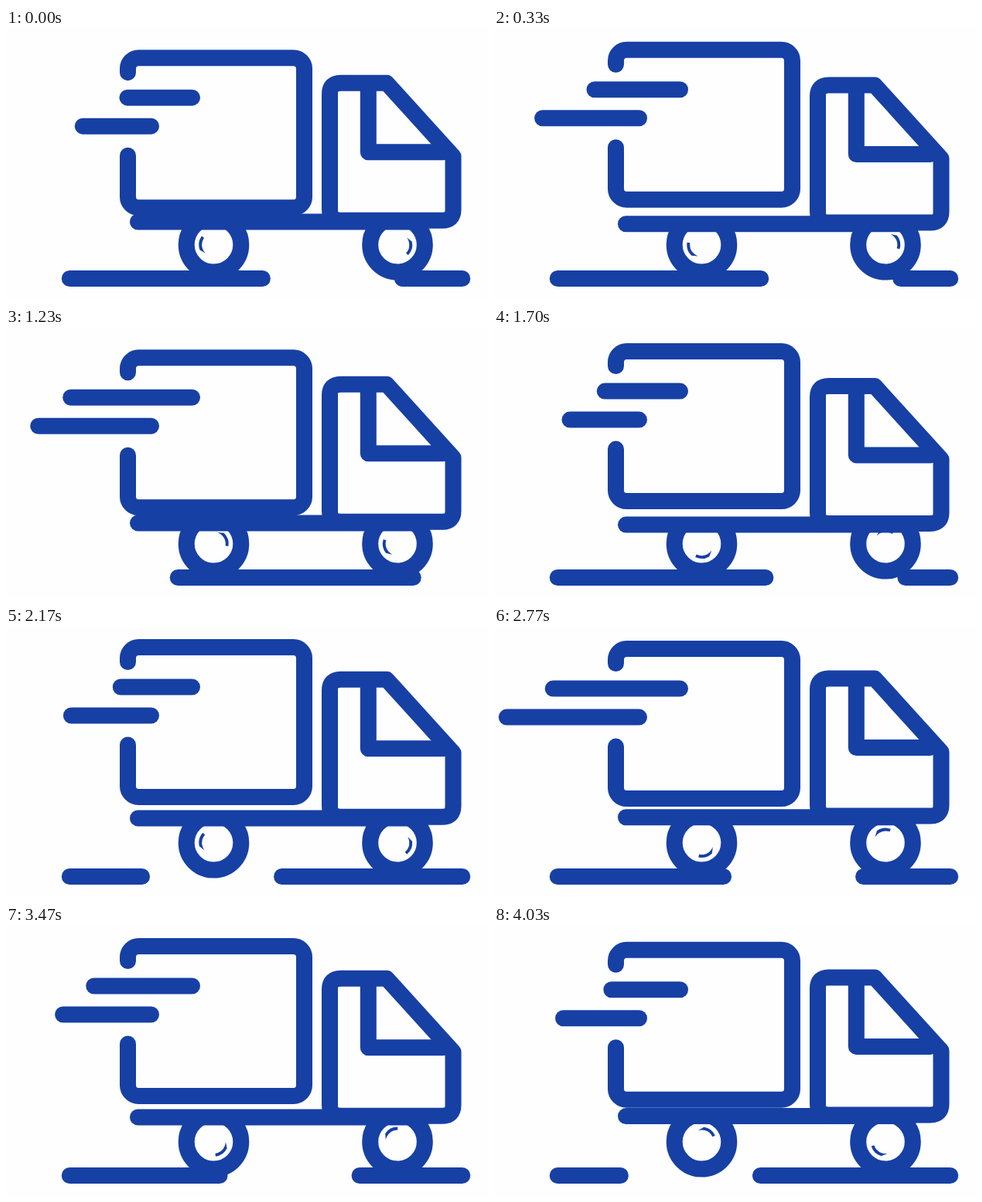
Write an HTML page that moves like this. It is 623 px wide and 351 px high and loops after 4060 ms.

```html
<!DOCTYPE html>
<html lang="en">
<head>
<meta charset="utf-8">
<title>Delivery truck</title>
<style>
  html, body { margin: 0; width: 100%; height: 100%; overflow: hidden; background: #fefefe; }
  svg { display: block; width: 100%; height: 100%; }
  .line { fill: none; stroke: #1740a5; stroke-width: 21; stroke-linecap: round; stroke-linejoin: round; }
  .shine { fill: #1740a5; }
</style>
</head>
<body>
<svg viewBox="0 0 623 351">
  <defs>
    <clipPath id="below"><rect y="251" width="623" height="100"/></clipPath>
    <path id="glint" d="M15.5 11.3A19.2 19.2 0 0 0 18 -6.6L10.8 -11Q13.5 -8 14.6 -4.5A15.3 15.3 0 0 1 12.4 9Z"/>
  </defs>

  <path id="road" class="line" d="M82.3 324.5H589.7" stroke-dasharray="304 181"/>

  <g class="line" clip-path="url(#below)">
    <circle cx="268.5" cy="280.8" r="35.3"/>
    <circle cx="506" cy="280.8" r="35.3"/>
  </g>
  <use id="rearGlint" class="shine" href="#glint"/>
  <use id="frontGlint" class="shine" href="#glint"/>

  <!-- Both groups are drawn with their top edge at y = 0 -->
  <g id="cab" class="line">
    <path d="M170.5 190.2H540"/>
    <path d="M432.5 10.5H492L578 105.5V174.5Q578 188.5 564 188.5H432.5Q418.5 188.5 418.5 174.5V24.5Q418.5 10.5 432.5 10.5Z"/>
    <path d="M468.3 13V100H564"/>
  </g>

  <g id="box" class="line">
    <path d="M157.5 29.5V24.5A14 14 0 0 1 171.5 10.5H371.5A14 14 0 0 1 385.5 24.5V190.5A14 14 0 0 1 371.5 204.5H171.5A14 14 0 0 1 157.5 190.5V137"/>
    <path id="upperStreak"/>
    <path id="lowerStreak"/>
  </g>
</svg>
<script>
  const LOOP = 4060;
  const RESTART = 3914.6;   // the drive cycle begins again here
  const FPS = 30;
  const BOUNCE = 650, STREAK = 2000;

  const el = id => document.getElementById(id);
  const set = (id, name, value) => el(id).setAttribute(name, value);
  const wave = (mid, amp, period, t) => mid + amp * Math.cos(2 * Math.PI * t / period);

  function streak(id, left, right, y) {
    set(id, 'd', `M${left + 10.4} ${y}H${right}`);
  }

  function glint(id, x, angle) {
    set(id, 'transform', `translate(${x} 280.8) rotate(${angle})`);
  }

  function draw(time) {
    const frame = Math.floor((time % LOOP + 5) * FPS / 1000);
    const t = frame * 1000 / FPS % RESTART;

    set('box', 'transform', `translate(0 ${wave(22.8, 6.45, BOUNCE, t + 60)})`);
    set('cab', 'transform', `translate(0 ${wave(62, 4.66, BOUNCE, t + 190)})`);
    streak('upperStreak', wave(102.4, 44.5, STREAK, t + 40), 240.5, 62);
    streak('lowerStreak', wave(48.6, 44.5, STREAK, t + 140), 187.5, 99);

    glint('rearGlint', 268.5, 180 + t);
    glint('frontGlint', 506, 8 + t);
    set('road', 'stroke-dashoffset', (54.9 + 1.415 * t) % 485);
  }

  let start;
  function tick(now) {
    start ??= now;
    draw(Math.max(0, now - start));
    requestAnimationFrame(tick);
  }
  draw(0);
  requestAnimationFrame(tick);
</script>
</body>
</html>
```
